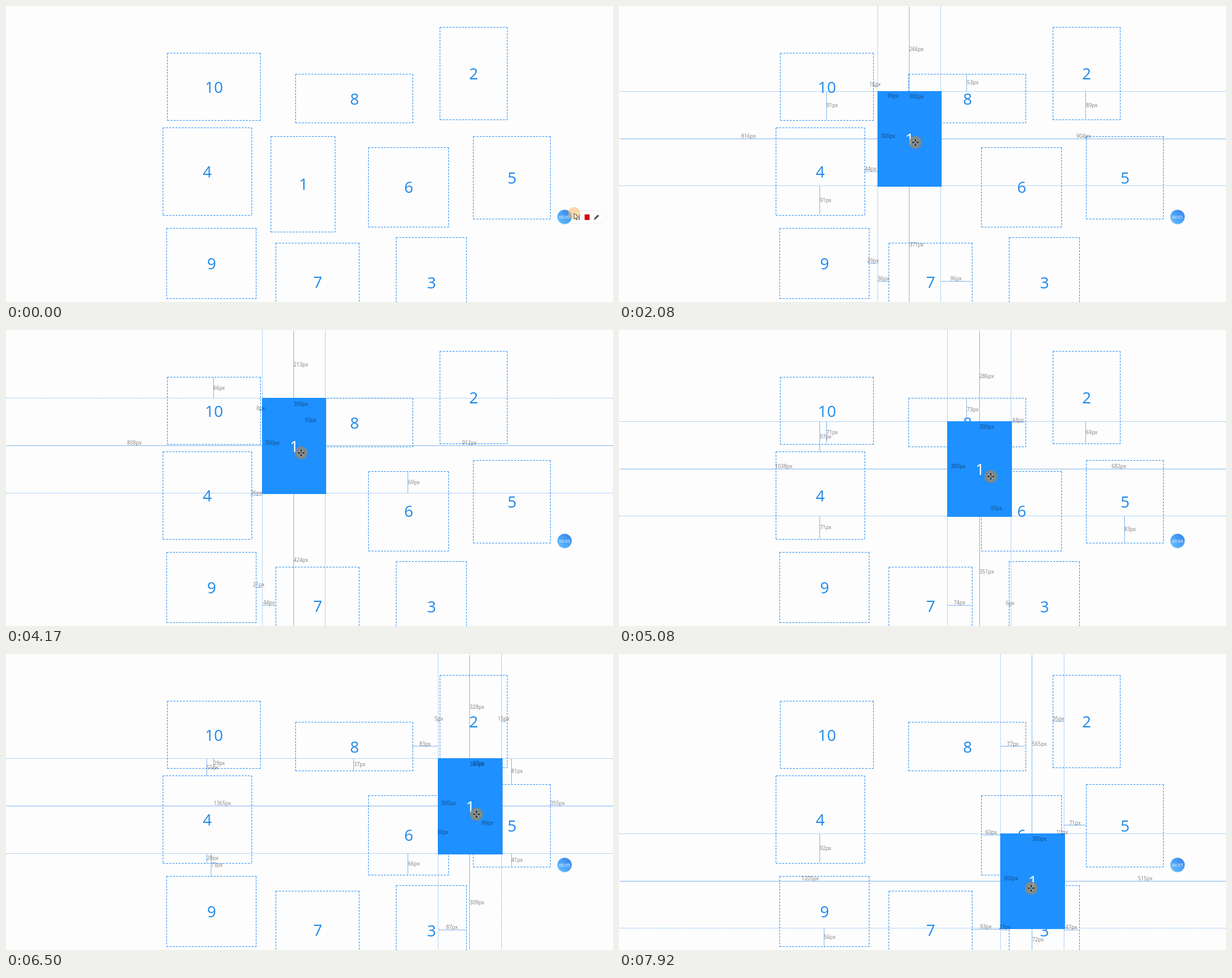
Recreate the animation shown at these times as an HTML page with a canvas. Size 984x480 px, loop 8000 ms.

```html
<!DOCTYPE html>
<html lang="en">
<head>
<meta charset="utf-8">
<title>Drag guides</title>
<style>
  html, body { margin: 0; width: 100%; height: 100%; overflow: hidden; background: #fdfdfd; }
  canvas { display: block; width: 100vw; height: 100vh; }
</style>
</head>
<body>
<canvas id="stage" width="984" height="480"></canvas>
<script>
const ctx = document.getElementById('stage').getContext('2d');
const W = 984, H = 480;
const PAGE_W = 1920, PAGE_H = 937, SCALE = 0.5125;
const LOOP = 8000, STEP = 1000 / 12, PRESS = 5, LEAD = 0.7, NEAR = 100;
const FONT = '"Open Sans", "Noto Sans", sans-serif';
const BLUE = '#1e90ff';

// label, left, top, right, bottom in page pixels
const boxes = [
  [10, 508, 147, 800, 357], [8, 915, 213, 1282, 365], [2, 1370, 65, 1580, 355],
  [4, 494, 383, 772, 657], [6, 1145, 444, 1395, 694], [5, 1476, 409, 1717, 669],
  [9, 506, 701, 787, 921], [7, 852, 747, 1112, 989], [3, 1232, 730, 1452, 1010]
];

// step, left, top of the dragged box
const path = [
  [0, 837, 409], [16, 837, 409], [28, 812, 240], [31, 812, 275], [37, 803, 384],
  [50, 808, 213], [61, 1038, 286], [78, 1365, 328], [93, 1272, 560],
  [95, 1205, 565], [96, 1170, 566]
];

const px = v => v * SCALE + 1;
const py = v => v * SCALE + 1.6;
const crisp = v => Math.floor(v) + 0.5;

// Monotone cubic through the path keys
function rate(i, c) {
  return (path[i + 1][c] - path[i][c]) / (path[i + 1][0] - path[i][0]);
}
function slope(i, c) {
  if (i === 0) return 0;
  if (i === path.length - 1) return rate(i - 1, c);
  const a = rate(i - 1, c), b = rate(i, c);
  return a * b <= 0 ? 0 : 2 * a * b / (a + b);
}
function along(n, c) {
  n = Math.min(n, 96);
  let i = 0;
  while (i < path.length - 2 && n >= path[i + 1][0]) i++;
  const span = path[i + 1][0] - path[i][0];
  const u = (n - path[i][0]) / span, v = 1 - u;
  return v * v * (1 + 2 * u) * path[i][c] + u * u * (3 - 2 * u) * path[i + 1][c]
    + span * u * v * (v * slope(i, c) - u * slope(i + 1, c));
}

const held = n => n % 6 === 3 || [24, 30, 32, 79].includes(n);
function stepAt(t) {
  let n = Math.floor((t + 4) / STEP);
  while (held(n)) n--;
  return n;
}

function line(x1, y1, x2, y2, color, dash = []) {
  ctx.strokeStyle = color;
  ctx.lineWidth = 1;
  ctx.setLineDash(dash);
  ctx.beginPath();
  ctx.moveTo(x1, y1);
  ctx.lineTo(x2, y2);
  ctx.stroke();
  ctx.setLineDash([]);
}

function disc(x, y, r, fill) {
  ctx.fillStyle = fill;
  ctx.beginPath();
  ctx.arc(x, y, r, 0, Math.PI * 2);
  ctx.fill();
}

function text(s, x, y, size, color, align) {
  ctx.font = size + 'px ' + FONT;
  ctx.textAlign = align;
  ctx.fillStyle = color;
  ctx.fillText(s, x, y);
}

function drawBox([name, l, t, r, b], solid) {
  const x1 = px(l), y1 = py(t), x2 = px(r + 4), y2 = py(b + 4);
  if (solid) {
    ctx.fillStyle = BLUE;
    const x = Math.floor(x1), y = Math.floor(y1);
    ctx.fillRect(x, y, Math.floor(x2) - x, Math.floor(y2) - y);
  } else {
    const dash = [3.1, 2];
    const a = crisp(x1), c = crisp(x2 - 0.6), d = crisp(y1), e = crisp(y2 - 0.75);
    for (const y of [d, e]) line(a, y, c, y, '#3093f5', dash);
    for (const x of [a, c]) line(x, d, x, e, '#3093f5', dash);
  }
  text(name, (x1 + x2) / 2, (y1 + y2) / 2 + 9.1, 25.6, solid ? '#fff' : '#1e88ea', 'center');
}

// Draws the lines around the dragged box and returns their labels
function guides([, l, t, r, b]) {
  const labels = [];
  const solid = '#8ab9ee', dots = '#8fbdf4';
  const cx = (l + r) / 2, cy = (t + b) / 2;

  function across(from, to, y) {
    const gy = crisp(py(y));
    line(px(from), gy, px(to), gy, solid);
    labels.push([Math.abs(Math.round(to - from)), px((from + to) / 2), py(y) - 1.2, 'center']);
  }
  function down(from, to, x) {
    const gx = crisp(px(x));
    line(gx, py(from), gx, py(to), solid);
    labels.push([Math.abs(Math.round(to - from)), px(x), py((from + to) / 2) + 3, 'left']);
  }
  // Each edge measures to the closer of the two sides of a neighbour
  function measure(edge, a, c, draw, at) {
    const side = Math.abs(edge - a) <= Math.abs(edge - c) ? a : c;
    const gap = Math.round(Math.abs(edge - side));
    if (gap > 0 && gap <= NEAR) draw(side, edge, at);
  }

  for (const y of [t, b]) line(0, crisp(py(y)), W, crisp(py(y)), dots, [1.5, 1]);
  for (const x of [l, r]) line(crisp(px(x)), 0, crisp(px(x)), H, dots, [1.5, 1]);
  across(0, l, cy);
  across(r, PAGE_W, cy);
  down(0, t, cx);
  down(b, PAGE_H, cx);

  for (const [, bl, bt, br, bb] of boxes) {
    for (const x of [l, r]) measure(x, bl, br, across, (bt + bb) / 2);
    for (const y of [t, b]) measure(y, bt, bb, down, (bl + br) / 2);
  }
  labels.push([300, px(l) + 5, py(cy) - 1.2, 'left']);
  labels.push([300, px(cx), py(t) + 12.2, 'left']);
  return labels;
}

function arrow(x, y) {
  const shape = [[0, 0], [0, 9.5], [2.2, 7.6], [3.8, 11], [5.2, 10.3], [3.7, 7.1], [6.6, 6.8]];
  ctx.beginPath();
  for (const [dx, dy] of shape) ctx.lineTo(x + dx, y + dy);
  ctx.closePath();
  ctx.fillStyle = '#fff';
  ctx.fill();
  ctx.strokeStyle = '#444';
  ctx.lineWidth = 0.9;
  ctx.stroke();
}

function moveIcon(x, y) {
  ctx.save();
  ctx.translate(x, y);
  for (let i = 0; i < 4; i++) {
    ctx.beginPath();
    ctx.moveTo(0, -6);
    ctx.lineTo(2.6, -3);
    ctx.lineTo(-2.6, -3);
    ctx.closePath();
    ctx.strokeStyle = '#eee';
    ctx.lineWidth = 1;
    ctx.stroke();
    ctx.fillStyle = '#1c1c1c';
    ctx.fill();
    line(0, -3, 0, 0, '#1c1c1c');
    ctx.rotate(Math.PI / 2);
  }
  disc(0, 0, 0.9, '#f4f4f4');
  ctx.restore();
}

function recorder(seconds, open) {
  if (open) {
    ctx.beginPath();
    ctx.roundRect(893.5, 331.5, 79, 21, 10.5);
    ctx.fillStyle = '#fcfcfc';
    ctx.fill();
    ctx.strokeStyle = '#f0f0f0';
    ctx.lineWidth = 1;
    ctx.stroke();
    ctx.fillStyle = '#666';
    ctx.fillRect(924, 338, 2, 9);
    ctx.fillRect(928.5, 338, 1.6, 9);
    ctx.fillStyle = '#d60000';
    ctx.fillRect(938, 338, 8, 9);
    ctx.strokeStyle = '#555';
    ctx.lineWidth = 3;
    ctx.beginPath();
    ctx.moveTo(955, 344.6);
    ctx.lineTo(960.5, 339.2);
    ctx.stroke();
    ctx.fillStyle = '#555';
    ctx.beginPath();
    ctx.moveTo(953, 346.8);
    ctx.lineTo(953.8, 343.4);
    ctx.lineTo(956.2, 345.8);
    ctx.fill();
  }
  disc(905.5, 342, 12.6, '#ecf0f4');
  const shade = ctx.createLinearGradient(897, 351, 914, 333);
  shade.addColorStop(0, '#5cbcff');
  shade.addColorStop(1, '#3a88ec');
  disc(905.5, 342, 11.5, shade);
  text('00:0' + seconds, 905.5, 344.8, 7, '#fff', 'center');
}

function draw(time) {
  const n = stepAt(time);
  const l = along(n, 1), t = along(n, 2);
  const box = [1, l, t, l + 200, t + 300];
  const drag = n >= PRESS;

  ctx.fillStyle = '#fdfdfd';
  ctx.fillRect(0, 0, W, H);

  const labels = drag ? guides(box) : [];
  boxes.forEach(b => drawBox(b, false));
  drawBox(box, drag);
  for (const [v, x, y, align] of labels) text(v + 'px', x, y, 8.3, 'rgba(0,0,0,.5)', align);

  recorder(Math.max(0, Math.floor((n * STEP - 580) / 1000)), n < 2);

  const hx = px(along(n + LEAD, 1)) + 62.2, hy = py(along(n + LEAD, 2)) + 88.2;
  if (drag) {
    disc(hx, hy, 10.5, 'rgba(145,135,115,.8)');
    moveIcon(hx, hy);
  } else {
    const u = n / PRESS, e = u * u * (3 - 2 * u);
    const x = 921 + (hx - 921) * e, y = 336 + (hy - 336) * e;
    disc(x, y, 10, 'rgba(250,185,100,.55)');
    arrow(x, y);
  }
}

function tick() {
  draw(performance.now() % LOOP);
  requestAnimationFrame(tick);
}
tick();
</script>
</body>
</html>
```
